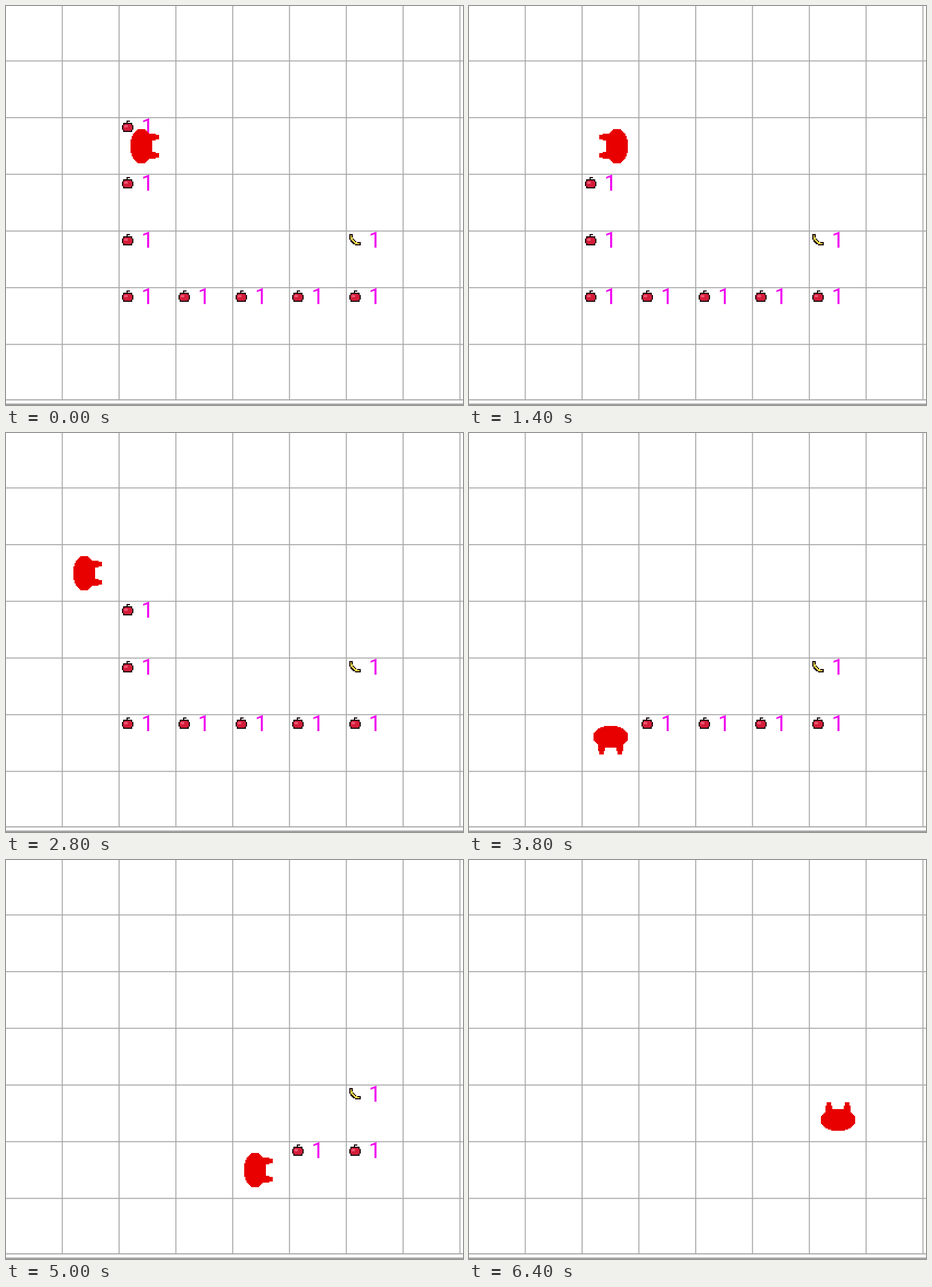
Write an HTML page with a canvas that moves like this. It is 800 px wide and 700 px high and loops after 6600 ms.

```html
<!DOCTYPE html>
<html lang="en">
<head>
<meta charset="utf-8">
<title>Fruit trail</title>
<style>
  html, body { margin: 0; width: 100%; height: 100%; overflow: hidden; background: #fff; }
  canvas { display: block; }
</style>
</head>
<body>
<canvas id="stage" width="800" height="700"></canvas>
<script>
const ctx = document.getElementById('stage').getContext('2d');
const CELL = 99.45, TICK = 200, LOOP = 6600, REST = 4, PIXEL = 2;
const INK = '#18060a';

const fruits = [];
for (let y = 2; y <= 5; y++) fruits.push({ x: 2, y });
for (let x = 3; x <= 6; x++) fruits.push({ x, y: 5 });
fruits.push({ x: 6, y: 4, banana: true });

// The walker follows fruit straight ahead; on a miss it turns back,
// returns to the last fruit and tries the next side.
function walk() {
  const poses = [];
  let x = 2, y = 2, dir = 0, misses = 0;
  const show = () => poses.push({ x, y, dir });
  const turn = quarters => { dir += quarters; };
  const step = () => {
    x += Math.round(Math.cos(dir * Math.PI / 2));
    y += Math.round(Math.sin(dir * Math.PI / 2));
  };
  const eat = () => {
    const found = fruits.find(f => f.x === x && f.y === y && !f.eatenAt);
    if (found) found.eatenAt = poses.length;
    return found;
  };

  while (poses.length <= REST) show();
  eat();
  while (fruits.some(f => !f.eatenAt)) {
    step();
    const found = eat();
    show();
    if (found) continue;
    // The first two about-turns are seen halfway round.
    const seen = misses++ < 2 ? -1 : -2;
    turn(seen);
    show();
    turn(-2 - seen);
    step();
    show();
    turn(1);
    show();
  }
  return poses;
}
const poses = walk();

function box(x, y, w, h, color) {
  ctx.fillStyle = color;
  ctx.fillRect(x, y, w, h);
}

// Paints each coarse pixel with the colour that pick() gives for its centre.
function sprite(from, to, pick) {
  for (let y = from; y < to; y += PIXEL) {
    for (let x = from; x < to; x += PIXEL) {
      const color = pick(x + PIXEL / 2, y + PIXEL / 2);
      if (color) box(x, y, PIXEL, PIXEL, color);
    }
  }
}

function place(x, y, dx, dy, draw) {
  ctx.save();
  ctx.translate(Math.round(dx + x * CELL), Math.round(dy + y * CELL));
  draw();
  ctx.restore();
}

function grid() {
  box(0, 0, 800, 700, '#fff');
  for (let i = 0; i < 8; i++) {
    box(97.6 + i * CELL, 0, 1.8, 691, '#a8a8a8');
    box(0, Math.min(95.5 + i * CELL, 690), 800, 1.8, '#a8a8a8');
  }
  box(0, 692, 800, 8, '#fff');
  box(0, 697.6, 800, 2, '#8c8c8c');
}

function apple(x, y) {
  if (y < 6 && x === 9 || y < 2 && x > 8 && x < 14) return INK;
  const edge = Math.abs((x - 10) / 10) ** 2.6 + Math.abs((y - 12) / 8.5) ** 2.6;
  if (edge > 1) return null;
  if (edge > 0.55) return INK;
  return Math.hypot(x - 7, y - 10) < 3 ? '#ea5874' : '#d41c3a';
}

function banana(x, y) {
  const outer = Math.hypot(x - 16, y - 4), inner = Math.hypot(x - 20, y);
  if (outer > 16 || inner < 15) return null;
  return outer > 14.2 || inner < 16 || y < 2 || x > 18 ? INK : '#e8d84c';
}

function walker(x, y) {
  const body = y > -8 && Math.hypot(x / 31, (y - 11) / 19.5) < 1;
  const ear = Math.hypot((Math.abs(x) - 16) / 6.5, (y + 4) / 17) < 1;
  return body || ear ? '#e80000' : null;
}

function drawFruit(f) {
  place(f.x, f.y, 4.1, 1.8, () => {
    sprite(0, 20, f.banana ? banana : apple);
    ctx.font = '38px Roboto, Inter, sans-serif';
    ctx.fillStyle = '#f000f0';
    ctx.fillText('1', 34, 24);
  });
}

function frame(now) {
  const tick = Math.floor((now % LOOP) / TICK);
  const pose = poses[Math.min(tick, poses.length - 1)];
  grid();
  fruits.forEach(f => { if (tick < f.eatenAt) drawFruit(f); });
  place(pose.x, pose.y, 48.8, 46.7, () => {
    ctx.rotate((pose.dir + 1) * Math.PI / 2);
    sprite(-32, 32, walker);
  });
}

const start = performance.now();
function loop() {
  frame(performance.now() - start);
  requestAnimationFrame(loop);
}
loop();
</script>
</body>
</html>
```
